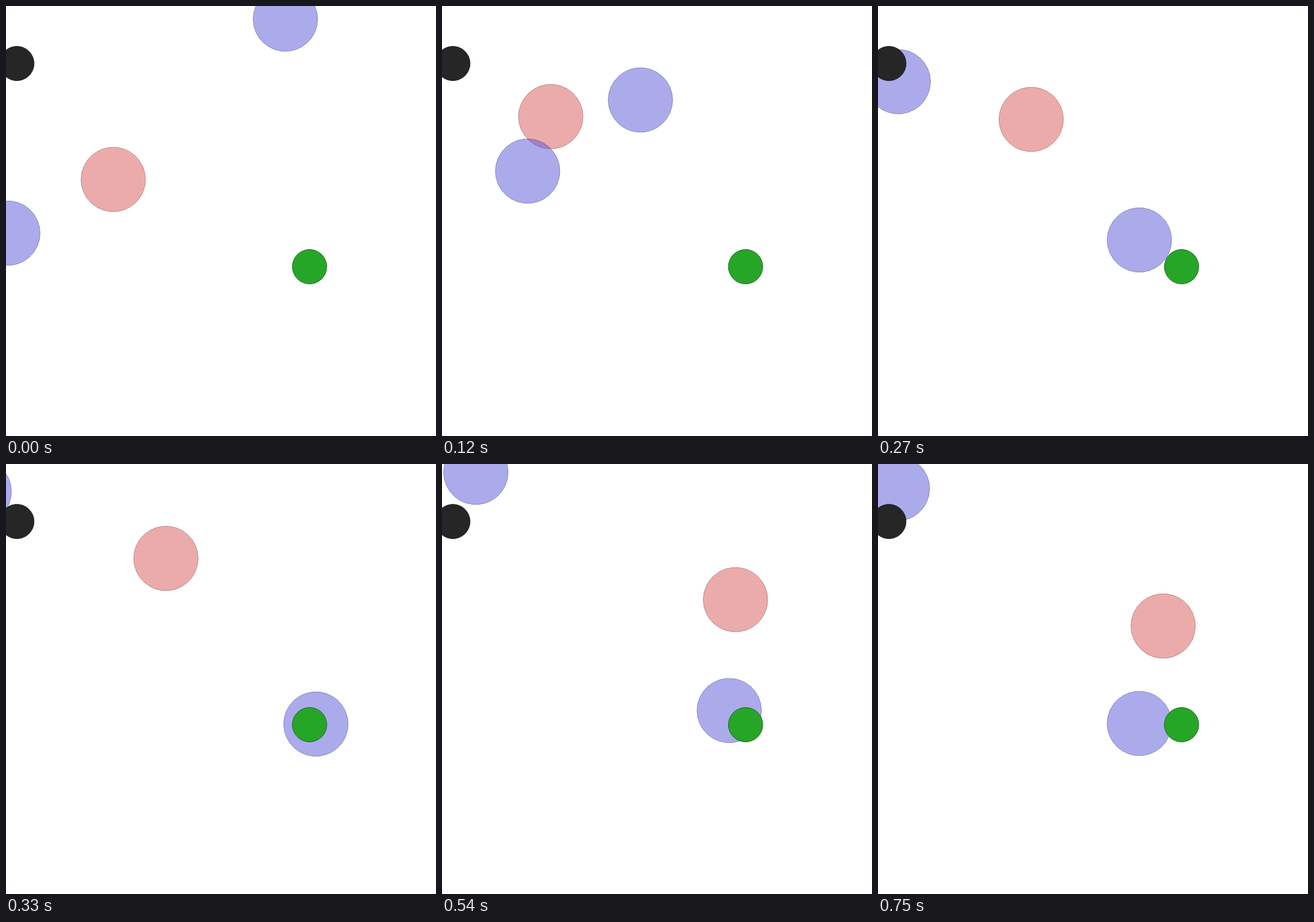
These frames come from a looping animation (700x700 px, 780 ms). An HTML page with a canvas:

```html
<!DOCTYPE html>
<html lang="en">
<head>
<meta charset="utf-8">
<title>Particle agents</title>
<style>
  html, body { margin: 0; width: 100%; height: 100%; overflow: hidden; background: #fff; }
  canvas { display: block; }
</style>
</head>
<body>
<canvas id="stage" width="700" height="700"></canvas>
<script>
const ctx = document.getElementById('stage').getContext('2d');
const STEP_MS = 30, STEPS = 26;
const KEEP = 0.75, MAX_THRUST = 17.8, SWEEPS = 3000;
const RED = [217, 89, 89], BLUE = [89, 89, 217], GREEN = [38, 166, 38], BLACK = [38, 38, 38];

// Steps at which every agent passes its next key point.
const keySteps = [0, 4, 7, 11, 15, 21, 25];
const agents = [
  { rgb: RED, xKeys: [174.6, 177, 246.8, 260.3, 407.5, 495.2, 464.2],
    yKeys: [282.4, 180, 200.2, 153.7, 145.7, 288.7, 263.7] },
  { rgb: BLUE, xKeys: [454.8, 323, 159.4, -43.6, 43.3, 22.4, 31.6],
    yKeys: [21.3, 153, 183.5, 45, 18.8, 12.8, 40] },
  { rgb: BLUE, xKeys: [3, 139.4, 311, 504.5, 499.6, 442, 425.4],
    yKeys: [369.8, 268.8, 319.8, 423.3, 407, 409.2, 422.4] }
];
const landmarks = [
  { rgb: GREEN, x: 494.2, y: 424.4 },
  { rgb: BLACK, x: 17.7, y: 93.6 }
];

// Distance covered n steps after a unit push, under damping.
const reach = n => n > 0 ? (1 - KEEP ** n) / (1 - KEEP) : 0;

// How much each step's thrust moves an agent between neighbouring key points.
const legs = keySteps.slice(1).map((end, i) => {
  const weights = Array.from({ length: STEPS - 1 },
    (_, k) => reach(end - k) - reach(keySteps[i] - k));
  return { weights, size: weights.reduce((sum, w) => sum + w * w, 0) };
});

// Finds a gentle, limited thrust through the key points, then runs it from rest.
function fly(keys) {
  const thrust = new Array(STEPS - 1).fill(0);
  for (let sweep = 0; sweep < SWEEPS; sweep++) {
    thrust.forEach((a, k) => thrust[k] = Math.max(-MAX_THRUST, Math.min(MAX_THRUST, a)));
    legs.forEach(({ weights, size }, i) => {
      let miss = keys[i + 1] - keys[i];
      weights.forEach((w, k) => miss -= w * thrust[k]);
      weights.forEach((w, k) => thrust[k] += w * miss / size);
    });
  }
  let pos = keys[0], speed = 0;
  return [pos, ...thrust.map(a => pos += speed = speed * KEEP + a)];
}

for (const agent of agents) {
  agent.xs = fly(agent.xKeys);
  agent.ys = fly(agent.yKeys);
}

function disc(x, y, radius, rgb, alpha) {
  ctx.beginPath();
  for (let i = 0; i < 30; i++) {
    const a = i * Math.PI / 15;
    ctx.lineTo(x + radius * Math.cos(a), y + radius * Math.sin(a));
  }
  ctx.closePath();
  ctx.fillStyle = `rgba(${rgb}, ${alpha})`;
  ctx.fill();
  ctx.strokeStyle = `rgba(${rgb.map(c => c >> 1)}, ${alpha * 0.85})`;
  ctx.stroke();
}

function draw() {
  const step = Math.floor(performance.now() / STEP_MS) % STEPS;
  ctx.fillStyle = '#fff';
  ctx.fillRect(0, 0, 700, 700);
  for (const { xs, ys, rgb } of agents) disc(xs[step], ys[step], 52.5, rgb, 0.5);
  for (const { x, y, rgb } of landmarks) disc(x, y, 28, rgb, 1);
  requestAnimationFrame(draw);
}
draw();
</script>
</body>
</html>
```
